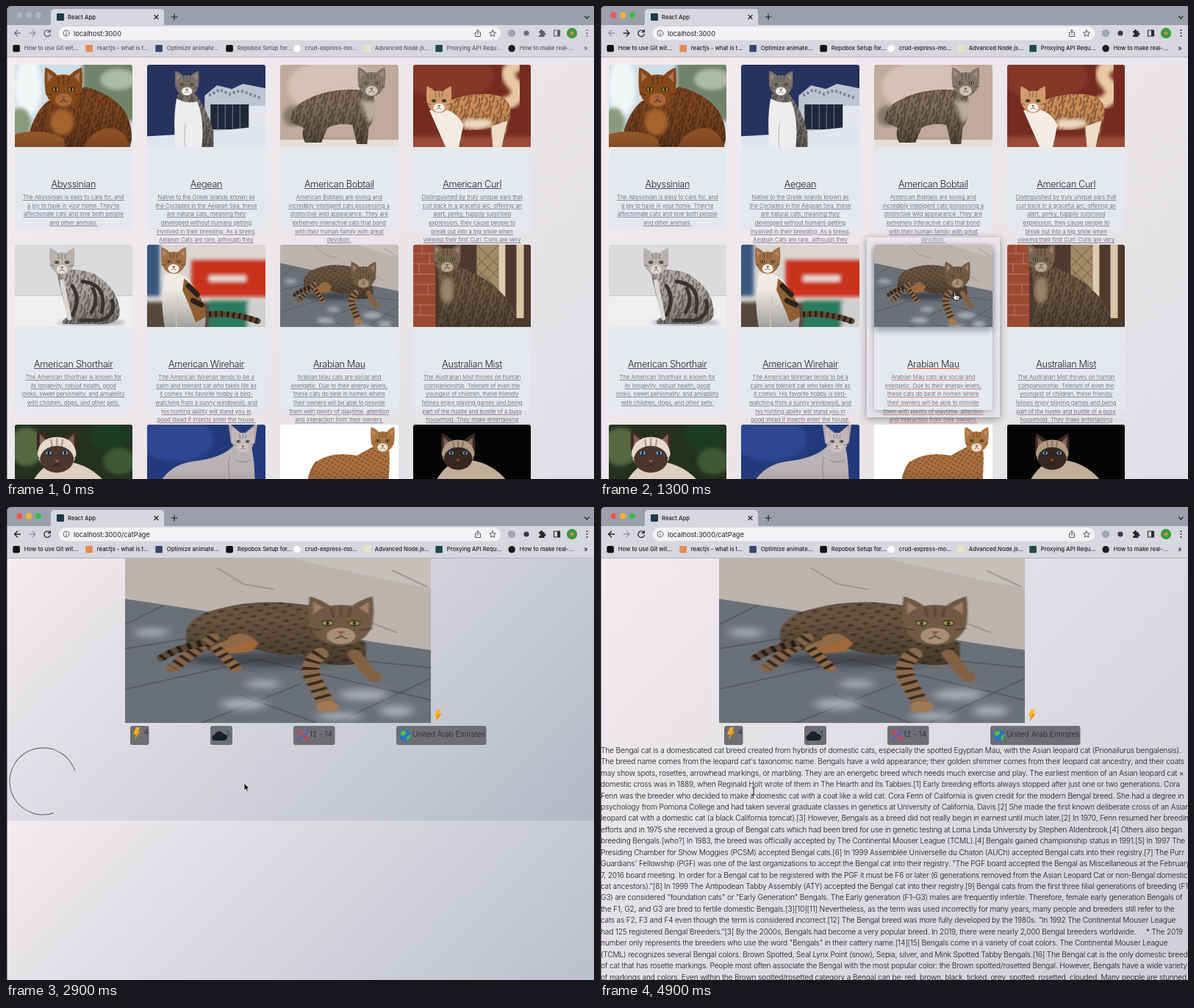
An HTML page for the animation above (5 s loop, 800 px wide and 644 px high).

```html
<!DOCTYPE html>
<html lang="en">
<head>
<meta charset="utf-8">
<title>React App</title>
<style>
html,body{margin:0;width:100%;height:100%;overflow:hidden;background:#1a0f1c}
#stage{position:relative;width:800px;height:644px;overflow:hidden;font-family:Inter,"Open Sans",sans-serif}
#stage div,#stage svg,h5,p{position:absolute;margin:0}
#page{inset:0;background:linear-gradient(135deg,#f2edef,#b4b9c6) 0 70px/800px 4600px}
.card{width:160.5px;height:225px;background:#e5e9ed;border-radius:3px}
.card .pic{left:0;top:0;width:160.5px;height:112px;border-radius:3px 3px 0 0}
.card h5,.card p{left:-10px;right:-10px;text-align:center;white-space:pre;text-decoration:underline 1px}
.card h5{top:155px;font:300 12.7px/16px Inter,sans-serif;letter-spacing:-.33px;color:#16212d;text-decoration-color:#5b3f86}
.card p{top:175.2px;font:300 7.7px/11.6px Inter,sans-serif;color:#555869;text-decoration-color:#9385a8}
.card.hot h5{text-decoration-color:#e0402c}
.card.hot p{text-decoration-color:#d08078}
.glow{inset:-10px;opacity:0;background:rgba(236,236,240,.2);box-shadow:0 2px 10px rgba(0,0,0,.38)}
.glow i{position:absolute;inset:10px;border-radius:3px;box-shadow:0 2px 9px rgba(40,40,60,.32)}
.glow i+i{bottom:123px;box-shadow:0 5px 10px rgba(40,40,60,.4)}
#big{left:162px;top:70px;width:416px;height:224px}
#spin{left:1px;top:323.5px;width:99px;height:99px;box-sizing:border-box;border:1.6px solid #55565c;border-bottom-color:transparent;border-radius:50%}
#prose{left:1px;top:323.8px;white-space:pre;font:300 10.15px/15.43px Inter,sans-serif;letter-spacing:-.15px;color:#15161a}
#stage>svg{left:0;top:0}
text{font-family:Inter,sans-serif}
</style>
</head>
<body>
<div id="stage">
  <div id="page">
    <div id="grid"></div>
    <div id="detail"></div>
  </div>
  <svg id="chrome" width="800" height="644"></svg>
  <svg id="pointer" width="800" height="644"></svg>
</div>
<script>
const $ = id => document.getElementById(id);

// drawing helpers
const p = (d, f) => `<path d="${d}" fill="${f}"/>`;
const s = (d, c, w = 1, dash = '') =>
  `<path d="${d}" fill="none" stroke="${c}" stroke-width="${w}" ${dash ? `stroke-dasharray="${dash}"` : 'stroke-linecap="round" stroke-linejoin="round"'}/>`;
const e = (x, y, rx, ry, f) => `<ellipse cx="${x}" cy="${y}" rx="${rx}" ry="${ry}" fill="${f}"/>`;
const r = (x, y, w, h, f, rx = 0) => `<rect x="${x}" y="${y}" width="${w}" height="${h}" rx="${rx}" fill="${f}"/>`;
const txt = (x, y, size, str, extra = '') => `<text x="${x}" y="${y}" font-size="${size}" ${extra}>${str}</text>`;
const bg = f => r(-10, -15, 180, 145, f);
const soft = art => `<g filter="url(#soft)">${art}</g>`;
const photo = art => `<g filter="url(#fine)">${art}</g>`;
const fur = (d, f, pat = '') => p(d, f) + (pat && p(d, `url(#${pat})`)) + p(d, 'url(#shade)');
const head = (x, y, k, f, muzzle, eye, outer = f, m = 1) =>
  `<g transform="translate(${x} ${y}) scale(${k})">` +
  p('M-16 3Q-18-8-16.500-21Q-9-18-5-13H5Q9-18 16.500-21Q18-8 16 3z', outer) + p('M-14.500-7L-14.500-17L-8-11zM14.500-7L14.500-17L8-11z', 'rgba(215,165,150,.45)') +
  p('M-16.500 0Q-15-14 0-14.500Q15-14 16.500 0Q15 9 7 14Q0 17-7 14Q-15 9-16.500 0z', f) +
  s('M-5-12L-4-6M0-13V-6M5-12L4-6M-16 3L-11 4M16 3L11 4', 'rgba(40,25,15,.32)', 1.4) +
  e(0, 8.5 / m, 7.5 * m, 6 * m, muzzle) +
  [-7, 7].map(i => e(i, -1, 3.1, 2.2, '#2a2019') + e(i, -1, 2.4, 1.700, eye) + e(i, -1, .9, 1.600, '#111')).join('') +
  p('M-2.200 5h4.400l-2.200 2.800z', '#8c5347') + s('M-3 10.500Q0 9 0 8Q0 9 3 10.500', 'rgba(40,25,20,.7)', .8) + '</g>';

const mau = photo(
  bg('#bab3ae') + p('M60-15H170V20Q110 4 60-15z', '#c6c0bb') +
  s('M48 2L62 14L78 18M124 40L142 50M140 4L158 16', '#98908b', .9) +
  p('M-10 23L0 25L60 38L130 57L160 63L170 65V130H-10z', '#6b7077') +
  s('M0 62L60 48M0 92L70 70L160 100M40 117L92 88M110 117L160 84M20 30L0 44M60 96L100 117M118 70L160 76', '#50555c', .8) +
  soft([[72, 88, 9, 3], [62, 103, 12, 4], [125, 96, 13, 4], [142, 108, 9, 4], [14, 50, 9, 3], [112, 112, 12, 3]].map(a => e(...a, 'rgba(180,184,190,.85)')).join('') +
    e(72, 70, 42, 5, 'rgba(40,42,48,.6)')) +
  fur('M32 55Q30 38 50 32Q72 24 97 30L126 58L126 72Q104 78 92 66Q80 68 68 62L50 66Q40 60 32 64z', '#65533f', 'spots') +
  p('M54 54Q62 46 70 58L66 64L52 66z', '#a0683b') +
  s('M62 54L48 62L58 76', '#8f6a47', 6) + s('M48 62L58 76', '#2e241d', 6, '2 3') +
  s('M46 54Q34 66 25 76', '#83644a', 7) + s('M46 54Q34 66 25 76', '#33281f', 7, '2 3') +
  s('M40 58Q26 62 19 69', '#5f4a38', 5) + s('M40 58Q26 62 19 69', '#241c17', 5, '2.500 3') +
  s('M120 66L128 80L131 83', '#836043', 7) + s('M102 66Q94 74 99 86L106 104', '#8a6a4b', 9) +
  s('M102 66Q94 74 99 86L104 99', '#372a20', 9, '2 3.500') + e(106, 105, 6, 4, '#a07a55') +
  head(113, 44, 1, '#705a45', '#a89078', '#a9a858'));

const cats = [
['Abyssinian', `The Abyssinian is easy to care for, and
a joy to have in your home. They’re
affectionate cats and love both people
and other animals.`,
  bg('#cfdde6') + soft(r(92, -19, 90, 95, '#71836a') + e(140, 20, 24, 14, '#aeb9a6') + e(18, 30, 18, 40, '#f2f6f7') + e(8, 80, 14, 22, '#8b9a7c')) +
  fur('M14 130Q18 72 44 50L96 30Q132 40 148 62Q160 80 158 104L150 130z', '#7a4320', 'tabby') +
  fur('M-5 130V96Q36 84 66 100L72 130z', '#8f5429') + fur('M88 130Q96 88 130 86Q156 88 160 130z', '#8c4e25') +
  soft(e(64, 78, 16, 18, '#a5642f')) + head(66, 35, 1.5, '#854819', '#a9673a', '#b08f3a')],
['Aegean', `Native to the Greek islands known as
the Cyclades in the Aegean Sea, these
are natural cats, meaning they
developed without humans getting
involved in their breeding. As a breed,
Aegean Cats are rare, although they`,
  bg('#27335f') + p('M78 42L95 28L115 33L130 26L170 34V112H78z', '#bfc4d2') + s('M84 42L98 34L112 40L126 35L156 46', '#7d8294', 4, '3 3') +
  r(86, 54, 52, 34, '#222737') + s('M96 54V88M106 54V88M116 54V88M126 54V88', '#626880', 1.3) + r(138, 56, 32, 36, '#e5e6ec') +
  p('M-10 98L60 94L170 82V130H-10z', '#e0e4ed') +
  fur('M42 130Q36 76 42 40L64 38Q82 60 90 92L90 130z', '#77726f', 'tabby') + p('M40 130Q34 76 40 46Q54 54 68 50Q80 78 72 130z', '#eeeded') + s('M52 80Q50 100 52 112', '#c4c3c8', 1.5) +
  head(54, 28, .95, '#78716c', '#f4f2f0', '#a8a860')],
['American Bobtail', `American Bobtails are loving and
incredibly intelligent cats possessing a
distinctive wild appearance. They are
extremely interactive cats that bond
with their human family with great
devotion.`,
  bg('#c0aa9b') + soft(e(70, 30, 60, 36, '#d3c2b5') + e(76, 106, 60, 6, '#a8978a')) + p('M-10 102H170V130H-10z', '#e6dfd7') +
  soft(e(18, 70, 14, 14, '#83786c')) +
  fur('M14 78Q12 62 28 52Q60 32 104 34L126 36Q134 66 120 86L118 108H104L98 82Q80 78 64 86L56 106H34Q28 94 32 86z', '#7a6a57', 'tabby') +
  soft(p('M108 46Q124 56 138 42Q136 70 120 80z', '#b9ac9d')) + head(124, 26, 1.1, '#83756a', '#cfc6bb', '#a9b869')],
['American Curl', `Distinguished by truly unique ears that
curl back in a graceful arc, offering an
alert, perky, happily surprised
expression, they cause people to
break out into a big smile when
viewing their first Curl. Curls are very`,
  bg('#752c20') + soft(e(50, 16, 60, 30, '#84382b') + r(-19, 98, 200, 34, '#9a4c39')) +
  soft(s('M122 54Q150 46 138 28Q120 10 138 2', '#e9c9a4', 18)) +
  fur('M30 60Q60 38 104 40Q134 42 132 68L122 112H108L104 86Q84 90 66 88L64 112H46z', '#c98a55', 'tabby') +
  soft(p('M66 84Q84 92 108 82L104 74H70z', '#ecd8c2')) + p('M22 62Q54 54 68 82L62 112H44z', '#f3ece4') + p('M106 84L128 76L120 112H108z', '#eedcc8') +
  head(35, 50, 1, '#d09a68', '#f7f1ea', '#6a6a58')],
['American Shorthair', `The American Shorthair is known for
its longevity, robust health, good
looks, sweet personality, and amiability
with children, dogs, and other pets.`,
  bg('#dbdbde') + r(-10, 70, 180, 60, '#efeff1') + r(-10, 69, 180, 1, '#c6c6ca') + soft(e(104, 106, 46, 4, '#a9a9ad')) +
  fur('M56 36Q84 30 108 40Q144 62 142 96Q138 110 110 108L66 108Q62 104 72 98Q64 70 58 44z', '#aaa6a2', 'tabby') +
  s('M92 50Q126 54 118 92M78 56Q90 74 78 96M132 76Q138 96 116 103H90M106 60Q114 76 104 92', '#38342f', 5) + s('M64 50Q68 70 74 100', '#d9d7d4', 6) +
  head(64, 25, 1, '#b6b2ae', '#dedbd7', '#a9a45f')],
['American Wirehair', `The American Wirehair tends to be a
calm and tolerant cat who takes life as
it comes. His favorite hobby is bird-
watching from a sunny windowsill, and
his hunting ability will stand you in
good stead if insects enter the house.`,
  bg('#d9d6d3') + soft(r(-15, -15, 32, 85, '#3a567f') + r(60, 21, 110, 50, '#c9311c') + r(84, 42, 50, 8, '#eedcd4') + r(-19, 78, 200, 50, '#57473b') + r(84, 76, 56, 46, '#2c7a5e') + r(136, 78, 44, 46, '#cfcfd2')) +
  s('M76 96Q110 90 150 104', '#5f4630', 8) + s('M76 96Q110 90 150 104', '#261d17', 8, '3 5') +
  fur('M24 40Q50 34 62 56Q84 82 78 112H24Q18 80 22 56z', '#eeebe7') +
  p('M50 46Q76 64 80 98L66 106Q60 88 48 62z', '#8f5f33') + s('M56 56L68 68M62 76L74 82', '#2b211b', 7) + s('M42 72Q38 94 40 112', '#c9c4be', 1.500) +
  head(36, 24, 1, '#a17046', '#f5f1ec', '#b9b060')],
['Arabian Mau', `Arabian Mau cats are social and
energetic. Due to their energy levels,
these cats do best in homes where
their owners will be able to provide
them with plenty of playtime, attention
and interaction from their owners.`, mau],
['Australian Mist', `The Australian Mist thrives on human
companionship. Tolerant of even the
youngest of children, these friendly
felines enjoy playing games and being
part of the hustle and bustle of a busy
household. They make entertaining`,
  bg('#4d3a2e') + r(-10, -10, 40, 140, '#9c4a33') + s('M0 12H30M0 26H30M0 40H30M0 54H30M0 68H30M0 82H30M0 96H30M12 0V12M22 12V26M8 26V40M20 54V68M10 82V96', '#b77b66', 1) +
  r(86, -10, 30, 110, '#a08a68') + s('M86 0L116 30M86 16L116 46M86 32L116 62M116 0L86 30M116 16L86 46M116 32L86 62', '#6f5c45', 1) + r(116, -10, 9, 115, '#dccdb1') + r(140, -10, 10, 110, '#d8c7a4') +
  fur('M28 130Q42 74 32 34L62 30Q98 42 120 66Q146 92 142 130z', '#685642', 'tabby') + soft(e(46, 62, 9, 18, '#97836b')) + head(46, 21, 1.1, '#75634f', '#b5a693', '#9ba364')],
['', '', bg('#26301f') + soft(e(16, 30, 24, 26, '#56693f') + e(130, 14, 30, 20, '#1d3a24') + e(142, 50, 22, 18, '#3d5a36')) +
  fur('M6 130Q20 60 56 50Q120 46 152 130z', '#ddd0c0') + head(57, 40, 1.6, '#e4d9ca', '#4b372d', '#62a8dc', '#3a2a24', 1.9)],
['', '', bg('#24397a') + soft(e(40, 20, 50, 30, '#2d4790')) +
  fur('M14 84Q30 54 62 50Q100 46 116 30L142 32Q148 60 146 130H10z', '#b9b2b6') + s('M112 44Q108 60 114 80M120 48Q130 54 140 48', '#8e858e', 1) +
  p('M114 26L110-3L128 12zM146 26L150-3L132 12z', '#b3a5aa') + head(130, 24, .9, '#c3babd', '#d0c5c6', '#9ab0a8')],
['', '', bg('#fff') + s('M50 54Q36 74 40 112', '#9a6232', 8) +
  fur('M44 130Q38 76 50 50Q70 36 104 42L126 30L148 36Q150 70 140 130H60z', '#a96f3d', 'spots') + head(139, 23, .95, '#ab743f', '#efe2d0', '#8fa05a')],
['', '', bg('#050505') + fur('M14 130Q26 60 62 48Q126 44 156 130z', '#c0ae99') + head(61, 40, 1.35, '#b09b85', '#35261f', '#6d97c4', '#3a2a22', 1.9)]
];

const story = `The Bengal cat is a domesticated cat breed created from hybrids of domestic cats, especially the spotted Egyptian Mau, with the Asian leopard cat (Prionailurus bengalensis).
The breed name comes from the leopard cat's taxonomic name. Bengals have a wild appearance; their golden shimmer comes from their leopard cat ancestry, and their coats
may show spots, rosettes, arrowhead markings, or marbling. They are an energetic breed which needs much exercise and play. The earliest mention of an Asian leopard cat ×
domestic cross was in 1889, when Reginald Holt wrote of them in The Hearth and Its Tabbies.[1] Early breeding efforts always stopped after just one or two generations. Cora
Fenn was the breeder who decided to make a domestic cat with a coat like a wild cat. Cora Fenn of California is given credit for the modern Bengal breed. She had a degree in
psychology from Pomona College and had taken several graduate classes in genetics at University of California, Davis.[2] She made the first known deliberate cross of an Asian
leopard cat with a domestic cat (a black California tomcat).[3] However, Bengals as a breed did not really begin in earnest until much later.[2] In 1970, Fenn resumed her breeding
efforts and in 1975 she received a group of Bengal cats which had been bred for use in genetic testing at Loma Linda University by Stephen Aldenbrook.[4] Others also began
breeding Bengals.[who?] In 1983, the breed was officially accepted by The Continental Mouser League (TCML).[4] Bengals gained championship status in 1991.[5] In 1997 The
Presiding Chamber for Show Moggies (PCSM) accepted Bengal cats.[6] In 1999 Assemblée Universelle du Chaton (AUCh) accepted Bengal cats into their registry.[7] The Purr
Guardians' Fellowship (PGF) was one of the last organizations to accept the Bengal cat into their registry. "The PGF board accepted the Bengal as Miscellaneous at the February
7, 2016 board meeting. In order for a Bengal cat to be registered with the PGF it must be F6 or later (6 generations removed from the Asian Leopard Cat or non-Bengal domestic
cat ancestors)."[8] In 1999 The Antipodean Tabby Assembly (ATY) accepted the Bengal cat into their registry.[9] Bengal cats from the first three filial generations of breeding (F1–
G3) are considered "foundation cats" or "Early Generation" Bengals. The Early generation (F1–G3) males are frequently infertile. Therefore, female early generation Bengals of
the F1, G2, and G3 are bred to fertile domestic Bengals.[3][10][11] Nevertheless, as the term was used incorrectly for many years, many people and breeders still refer to the
cats as F2, F3 and F4 even though the term is considered incorrect.[12] The Bengal breed was more fully developed by the 1980s. "In 1992 The Continental Mouser League
had 125 registered Bengal Breeders."[3] By the 2000s, Bengals had become a very popular breed. In 2019, there were nearly 2,000 Bengal breeders worldwide.     * The 2019
number only represents the breeders who use the word "Bengals" in their cattery name.[14][15] Bengals come in a variety of coat colors. The Continental Mouser League
(TCML) recognizes several Bengal colors. Brown Spotted, Seal Lynx Point (snow), Sepia, silver, and Mink Spotted Tabby Bengals.[16] The Bengal cat is the only domestic breed
of cat that has rosette markings. People most often associate the Bengal with the most popular color: the Brown spotted/rosetted Bengal. However, Bengals have a wide variety
of markings and colors. Even within the Brown spotted/rosetted category a Bengal can be: red, brown, black, ticked, grey, spotted, rosetted, clouded. Many people are stunned`;

// breed grid
$('grid').innerHTML = cats.map(([name, about, art], i) =>
  `<div class="card" style="left:${11.5 + 180.8 * (i % 4)}px;top:${80 + 245 * (i >> 2)}px"><div class="glow"><i></i><i></i></div>` +
  `<svg class="pic" viewBox="0 0 160 112" preserveAspectRatio="none">${photo(art)}</svg><h5>${name}</h5><p>${about}</p></div>`).join('');

// breed page
const bolt = (x, y) => `<g transform="translate(${x} ${y})">${p('M-1-8H4L2-2.500H5L-3 8L-1 1.500H-5z', '#f9b41c')}${p('M2-2.500H5L-3 8L-1 1.500z', '#f08c1a')}</g>`;
const badge = (x, w) => r(x, 298, w, 26, '#6e6f72', 3);
$('detail').innerHTML = `<svg id="big" viewBox="0 -5 160 122" preserveAspectRatio="none">${mau}</svg>` +
  '<svg width="800" height="330"><g fill="#252629" font-weight="300">' + badge(169, 25.5) + badge(278, 30) + badge(391, 56.5) + badge(531, 122.5) +
  bolt(587.5, 284) + bolt(178, 308) + p('M285 318a4 4 0 0 1-1-8a6.500 6.500 0 0 1 12-1a4.500 4.500 0 0 1 1 9z', '#15222b') +
  s('M398 304C398 311 410 311 410 318', '#e8323c', 2) + s('M410 304C410 311 398 311 398 318', '#3d63e0', 2) + s('M399 306H409M399 316H409M402 309H406', '#d24a7a', 1) +
  e(543, 311, 8, 8, '#2a72c8') + p('M537 306L542 304L545 308L541 312L537 311zM546 311L551 310L549 316L545 318z', '#53b848') +
  txt(187.5, 310, 10.2, '4') + txt(299.5, 313, 10.2, '1') + txt(413, 313, 10.2, '12 - 14') + txt(553, 313, 10.2, 'United Arab Emirates') +
  `</g></svg><div id="spin"></div><div id="prose">${story}</div>`;

// browser window
const marks = [
  [14, 'How to use Git wit...', '#111', 2], [113, 'reactjs - what is t...', '#e58a52', 1], [208, 'Optimize animate...', '#33476e', 1], [304, 'Repobox Setup for...', '#111', 2],
  [396, 'crud-express-mo...', '#fff', 5], [491, 'Advanced Node.js...', '#e9e4c4', 1], [589, 'Proxying API Requ...', '#1d4a4a', 1], [688, 'How to make real-...', '#1c1c20', 5]];
$('chrome').innerHTML = `<defs>
  <filter id="soft"><feGaussianBlur stdDeviation="2.500"/></filter>
  <filter id="fine"><feGaussianBlur stdDeviation=".4"/></filter>
  <linearGradient id="shade" x2="0" y2="1"><stop offset=".3" stop-opacity="0"/><stop offset="1" stop-opacity=".32"/></linearGradient>
  <pattern id="tabby" width="15" height="19" patternUnits="userSpaceOnUse" patternTransform="rotate(14)">${s('M2 0Q6 5 3 11M8 4Q11 10 7 18M13 9Q10 14 13 19M12 1V5', 'rgba(30,20,14,.42)', 2)}</pattern>
  <pattern id="spots" width="8" height="7" patternUnits="userSpaceOnUse" patternTransform="rotate(-12)">${e(2, 2, 1.600, .9, 'rgba(35,24,16,.5)') + e(6, 5.5, 1.500, .9, 'rgba(35,24,16,.45)')}</pattern></defs>` +
  r(0, 0, 800, 27, '#9c9eab') + p('M57 27Q61 27 61 23V9Q61 4 66 4H210Q215 4 215 9V23Q215 27 219 27z', '#d6d7df') + r(0, 26, 800, 43, '#d6d7df') + r(0, 69, 800, 1, '#b3b4bd') +
  r(72, 28, 601, 18.5, '#f3f3f6', 9) + '<g id="lights"></g><g id="back"></g><g id="fwd"></g><g fill="#1d1e22">' +
  r(69, 10, 10, 10, '#1d3a48', 1) + txt(84, 17.5, 7.7, 'React App', 'font-weight="500"') + txt(92, 40.5, 9.2, 'localhost:3000', 'id="url"') +
  s('M202 12.500L207 17.500M207 12.500L202 17.500M225 15H233M229 11V19M787.500 14L790.300 17L793 14', '#222', 1.2) +
  s('M82 36.500V39.500M82 34.500V34.600M86 37A4 4 0 1 0 78 37A4 4 0 1 0 86 37', '#55575e', .9) +
  s('M640 36H638.500V41.500H645.500V36H644M642 38.500V32.500M640 34.500L642 32.500L644 34.500', '#44464c', .9) +
  s('M662 32.800L663.300 35.800L666.500 36.100L664 38.200L664.800 41.300L662 39.600L659.200 41.300L660 38.200L657.500 36.100L660.700 35.800z', '#44464c', .9) +
  e(688, 37, 5.3, 5.3, '#a4a6ae') + e(770, 37, 7.2, 7.2, '#3f9a3c') + e(770, 37, 2.5, 2.2, '#d9876a') +
  marks.map(([x, , c, rx]) => r(x - 4.7, 53, 9.6, 9.6, c, rx)).join('') + '</g><g id="tools" fill="#1d1e22">' +
  s('M59.500 34.500A4.300 4.300 0 1 0 60.300 38.500M60.300 32.500V35.500H57.300', '#2a2b30', 1.3) + e(708, 37, 3.6, 3.6, '#3a3b42') +
  p('M725 34H727A1.600 1.600 0 1 1 730 34H732.500V36.500A1.600 1.600 0 1 1 732.500 39.500V42H725V39.500A1.600 1.600 0 1 0 725 36.500z', '#2a2b30') +
  s('M745.500 33H753.500V41H745.500z', '#2a2b30', 1.2) + r(750, 33, 4, 8, '#2a2b30') +
  [33, 37, 41].map(y => e(790.5, y, 1, 1, '#222')).join('') +
  marks.map(([x, label]) => txt(x + 10.8, 60.3, 7.7, label, 'font-weight="450"')).join('') + txt(786, 61, 10, '»') +
  '</g>' + r(0, 0, 1.4, 644, '#1a0f1c') + p('M0 0H6Q1 1 0 7z', '#1a0f1c');

const arrow = (x, dir) => s(`M${x - 4 * dir} 37H${x + 4 * dir}M${x} 33L${x + 4 * dir} 37L${x} 41`, 'currentColor', 1.3);
$('back').innerHTML = arrow(15.5, -1);
$('fwd').innerHTML = arrow(36, 1);

const shapes = {
  arrow: '<path d="M0 0V10L2.300 8L3.900 11.600L5.600 10.900L4.100 7.400H7.300z" fill="#111" stroke="#fff" stroke-width=".8"/>',
  hand: '<path d="M-1 1Q0-.5 1 1V4.500L6 5.500Q7 6 6.500 8L5.500 11H0L-3 7Q-3 5.500-1 6.500z" fill="#fff" stroke="#111" stroke-width="1"/>' + s('M2.500 6.500V9M4.300 6.500V9', '#111', .6),
  beam: s('M-2-5.500Q0-5.500 0-4V4Q0 5.500-2 5.500M2-5.500Q0-5.500 0-4M0 4Q0 5.500 2 5.500', '#222', 1)
};
$('pointer').innerHTML = Object.entries(shapes).map(([k, v]) => `<g id="${k}">${v}</g>`).join('');

// motion
const track = [[300, 652, 640], [600, 630, 520], [800, 580, 440], [1000, 493, 392], [1700, 469, 386], [2200, 421, 379], [2600, 326, 376], [2900, 324, 376], [4400, 224, 388], [4900, 209, 387]];
const ramp = (t, a, b) => Math.min(1, Math.max(0, (t - a) / (b - a)));
const show = (el, on) => { el.style.display = on ? '' : 'none'; };
const cards = document.querySelectorAll('.card');
const hover = (i, amount, hot) => {
  cards[i].firstChild.style.opacity = amount;
  cards[i].classList.toggle('hot', hot);
};

function place(t) {
  const i = Math.max(1, track.findIndex(k => k[0] >= t));
  const [a, b] = [track[i - 1], track[i]];
  const u = ramp(t, a[0], b[0]);
  const kind = t < 300 ? '' : t >= 600 && t < 2200 ? 'hand' : t < 4800 ? 'arrow' : 'beam';
  for (const k in shapes) {
    show($(k), k === kind);
    $(k).setAttribute('transform', `translate(${a[1] + (b[1] - a[1]) * u} ${a[2] + (b[2] - a[2]) * u})`);
  }
}

function render(t) {
  const active = t >= 300, opened = t >= 2300, loaded = t >= 4800;
  show($('grid'), !opened);
  show($('detail'), opened);
  show($('spin'), !loaded);
  show($('prose'), loaded);
  $('page').style.backgroundSize = `800px ${loaded ? 1500 : opened ? 357 : 4600}px`;
  $('lights').innerHTML = ['#f4554d', '#f5b52b', '#35bf45'].map((c, i) => e(18.3 + 12.8 * i, 12.5, 3.9, 3.9, active ? c : '#b2b4bf')).join('');
  $('tools').style.opacity = active ? 1 : .68;
  $('back').style.color = t >= 2200 ? '#222' : active ? '#92949e' : '#74767f';
  $('fwd').style.color = active && !opened ? '#222' : '#92949e';
  $('url').textContent = 'localhost:3000' + (t >= 2200 ? '/catPage' : '');
  hover(7, ramp(t, 500, 800) * (1 - ramp(t, 1000, 1300)), t >= 600 && t < 900);
  hover(6, ramp(t, 1000, 1300), t >= 1100);

  // the loader stalls briefly after the page opens
  const clock = t < 2900 ? Math.min(t, 2600) + 300 : t;
  const turn = (.824 + (clock - 2900) / 758 + 9) % 1;
  $('spin').style.transform = `rotate(${turn * 360}deg) scale(${.8 + .4 * Math.abs(turn - .5)})`;
  place(t);
}

const start = performance.now();
let last = -1;
(function tick() {
  const t = Math.floor((performance.now() - start) % 5000 / 100) * 100;
  if (t !== last) render(last = t);
  requestAnimationFrame(tick);
})();
</script>
</body>
</html>
```
